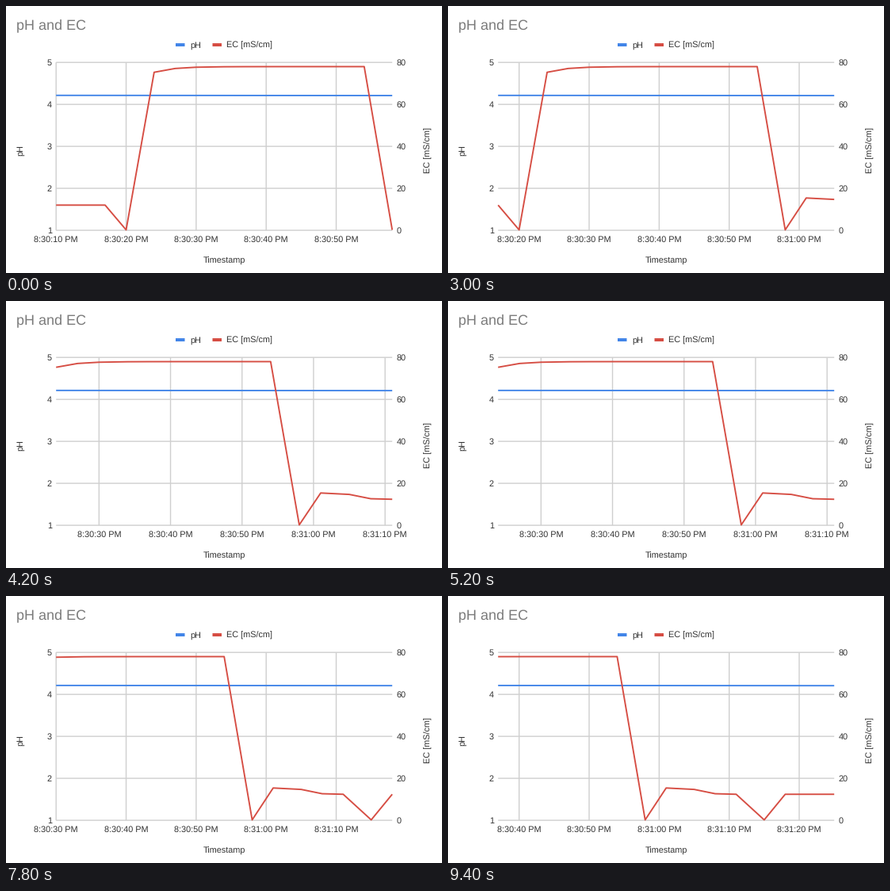
Recreate the animation shown at these times as a matplotlib script. Size 550 px wide and 337 px high, loop 9.6 s.

```python
from math import exp

import matplotlib.pyplot as plt
from matplotlib.animation import FuncAnimation
from matplotlib.patches import Rectangle

W, H, DPI = 550, 337, 100
PX = 72 / DPI
STEP = 200
FRAMES = 48
SAMPLES = 15  # readings visible at once

LEFT, RIGHT, TOP, BOTTOM = 63.2, 487.2, 71.2, 283.1
BLUE, RED, GRID, INK, GREY = "#4285e8", "#d64d43", "#cfcfcf", "#333333", "#7b7b7b"
RINSES = (20, 58, 75)  # the probe is in clean water at these seconds

plt.rcParams["font.family"] = "Liberation Sans"
plt.rcParams["text.hinting"] = "none"
fig = plt.figure(figsize=(W / DPI, H / DPI), dpi=DPI, facecolor="white")
ax = fig.add_axes([0, 0, 1, 1])
ax.set_xlim(0, W)
ax.set_ylim(H, 0)
ax.axis("off")


def ec(s):
    if s in RINSES:
        return 0.2
    if s < 20:
        return 12
    if s < 58:
        return 78 - 2.7 * exp((24 - s) / 2.7)
    return 12.4 + 3 * exp(-((s - 61) / 5.6) ** 4)


def ph(s):
    return 4.216 - 0.0001 * s


# Seconds after 8:30:00 PM, one reading every 3.42 s
seconds = [int(10.4 + 3.42 * i) for i in range(23)]


def label(x, y, text, size=10.9, color=INK, ha="center", rotation=0):
    return ax.text(x, y, text, fontsize=size * PX, color=color, ha=ha,
                   va="baseline", rotation=rotation, rotation_mode="anchor")


def stroke(color, width, z):
    return ax.plot([], [], color=color, lw=width * PX, zorder=z, snap=False,
                   solid_capstyle="butt", solid_joinstyle="round")[0]


def scale(value, low, high):
    return BOTTOM - (value - low) / (high - low) * (BOTTOM - TOP)


def clock(s):
    return f"8:{30 + s // 60}:{s % 60:02d} PM"


label(13, 28.8, "pH and EC", size=18, color=GREY, ha="left")
for x, color, name in [(214, BLUE, "pH"), (260.5, RED, "EC [mS/cm]")]:
    ax.add_patch(Rectangle((x, 47), 11.5, 4, color=color, lw=0, snap=False))
    label(x + 18, 52.5, name, ha="left")

for i in range(5):
    y = scale(i, 0, 4)
    stroke(GRID, 1.4, 1).set_data([LEFT, RIGHT], [y, y])
    label(58, y + 3.8, str(i + 1), ha="right")
    label(492.3, y + 3.8, str(20 * i), ha="left")

label(275.5, 324.7, "Timestamp")
label(21.5, 182.3, "pH", rotation=90)
label(535.5, 182.3, "EC [mS/cm]", rotation=90)

ticks = [(stroke(GRID, 1.4, 1), label(0, 298, "")) for _ in range(5)]
ph_line = stroke(BLUE, 1.9, 3)
ec_line = stroke(RED, 1.9, 4)


def draw(frame):
    now = 61 + (frame * STEP - 780) / 341
    times = [s for s in seconds if s <= now][-SAMPLES:]
    first, last = times[0], times[-1]

    def across(s):
        return LEFT + (s - first) / (last - first) * (RIGHT - LEFT)

    xs = [across(s) for s in times]
    ph_line.set_data(xs, [scale(ph(s), 1, 5) for s in times])
    ec_line.set_data(xs, [scale(ec(s), 0, 80) for s in times])

    tick = -(-first // 10) * 10
    for line, text in ticks:
        shown = tick <= last
        line.set_visible(shown)
        text.set_visible(shown)
        x = across(tick)
        line.set_data([x, x], [TOP, BOTTOM])
        text.set_x(x)
        text.set_text(clock(tick))
        tick += 10
    return []


anim = FuncAnimation(fig, draw, frames=FRAMES, interval=STEP, repeat=True)
plt.show()
```
